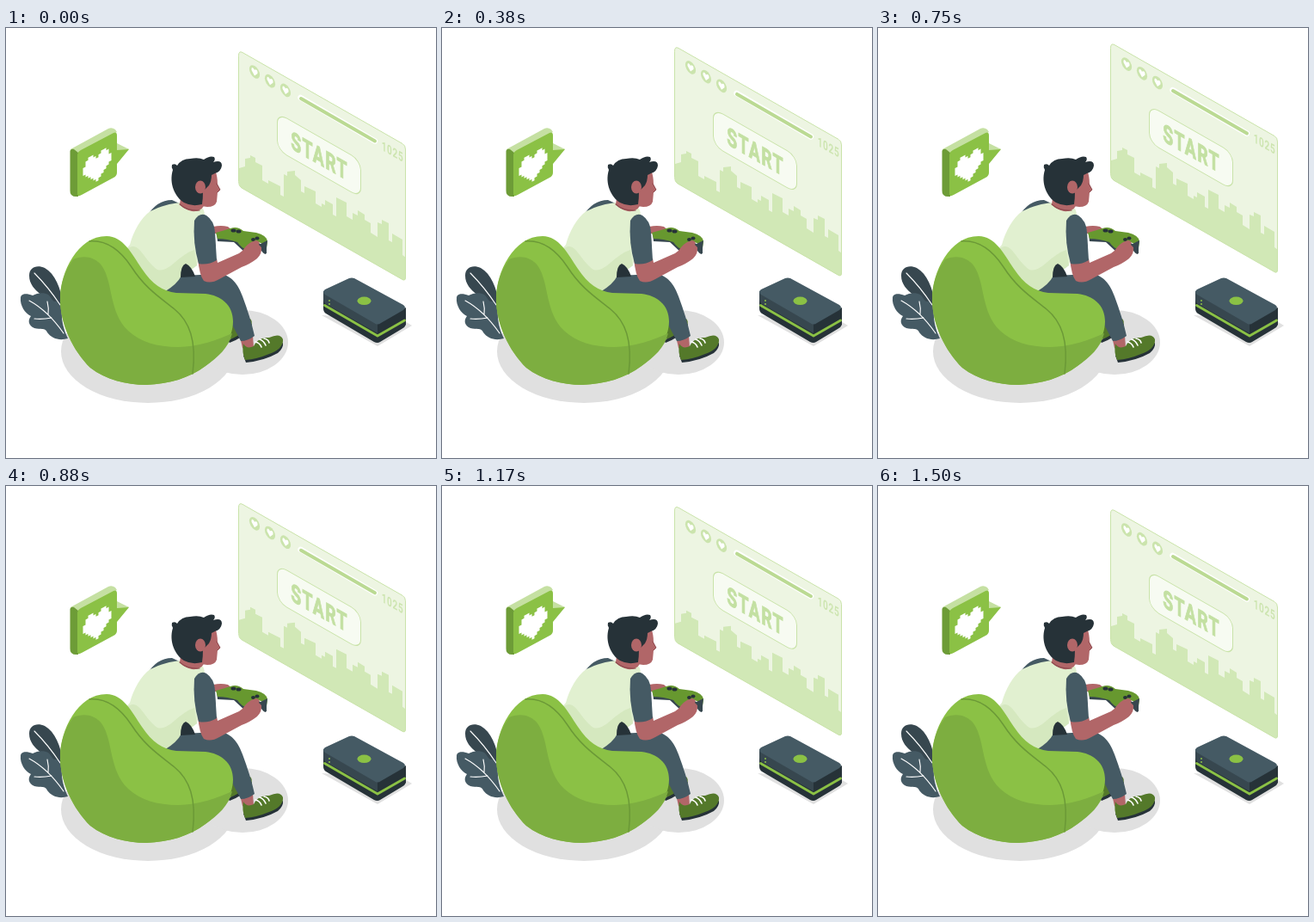
An HTML page that plays this animation: 500 px wide and 500 px high, repeating every 1.54 s.

```html
<!DOCTYPE html>
<html lang="en">
<head>
<meta charset="utf-8">
<title>Start screen</title>
<style>
html, body { margin: 0; width: 100%; height: 100%; overflow: hidden; background: #fff; }
svg { display: block; width: 100%; height: 100%; }
text { font-family: Roboto, Inter, sans-serif; font-weight: 700; text-anchor: middle; }
.line { fill: none; stroke-linecap: round; stroke-linejoin: round; }
.slate { fill: #455a64; }
.dusk { fill: #37474f; }
.ink { fill: #263238; }
.skin { fill: #b16668; }
.leaf { fill: #8bc145; }
.moss { fill: #54792a; }
</style>
</head>
<body>
<svg viewBox="0 0 500 500">
  <!-- floor shadows -->
  <g fill="#e0e0e0">
    <ellipse cx="165" cy="376" rx="101" ry="60"/>
    <ellipse cx="275" cy="365.500" rx="53" ry="37.500"/>
    <path d="M367 334L432 370L472 346L462 340Z"/>
  </g>

  <!-- plant -->
  <path class="dusk" d="M27 288C27 278 36 275 45 279C57 286 64 302 66 322L62 325C52 315 27 307 27 288Z"/>
  <path class="slate" d="M17 314C17 309 23 308 31 311C36 308 44 307 49 310C52 312 53 316 56 318C62 317 65 322 65 327C64 340 67 350 72 361C62 364 53 361 48 354C46 348 40 351 33 349C26 346 25 340 29 335C22 332 16 322 17 314Z"/>
  <g class="line" stroke="#fff" stroke-width="1.100">
    <path d="M33 285Q49 301 63 322"/>
    <path d="M27 317Q49 329 67 355M48 318Q50 326 49 333M33 338Q42 339 53 337"/>
  </g>

  <!-- torso -->
  <path class="slate" d="M164 219Q175 200 193 200L204 205L178 213Z"/>
  <path fill="#e1f0d0" d="M144 252C148 237 157 220 168 213C180 207 191 204 203 203L229 210C234 218 230 240 222 276L205 289Q198 303 186 310L150 295L135 262Z"/>
  <path fill="#d5e8bf" d="M140 258C154 244 160 270 176 281C190 285 200 264 219 258L222 276L205 289Q198 303 186 310L150 295Z"/>

  <!-- back foot and legs -->
  <path class="ink" d="M258 364L286 344L286 349Q274 361 260 366Z"/>
  <path class="moss" d="M258 344L271 347Q277 338 284 338Q287 341 285 346Q273 358 258 363Z"/>
  <path class="skin" d="M272 359L287 357L288 372Q282 377 275 372Z"/>
  <path class="slate" d="M184 307Q199 298 204 288L248 286C262 287 270 298 275 312C281 328 286 344 289 358Q281 364 273 364L255 330L215 318Z"/>
  <path class="ink" d="M203 290Q203 276 209 274Q216 277 220 289Z"/>
  <path class="ink" d="M276 381L279 389Q300 387 316 378Q323 372 322 366Z"/>
  <path class="moss" d="M276 367Q280 374 288 370C292 362 298 360 306 360Q319 354 322 362C323 370 315 376 306 379Q292 385 278 386Q274 377 276 367Z"/>
  <path class="line" stroke="#fff" stroke-width="1.600" d="M290 365Q295 366 297 371M295 362Q300 364 302 369M300 361Q305 362 306 366"/>

  <!-- bean bag -->
  <path class="leaf" d="M63 315C63 284 83 242 117 242C136 242 146 262 158 280C170 298 182 306 198 308L232 309C250 311 264 322 264 341C264 360 251 379 232 393C213 407 190 414 163 415C140 415 116 409 98 395C78 375 63 345 63 315Z"/>
  <path fill="#7dae40" d="M63 315C63 297 69 281 78 269C90 264 103 266 111 276C125 295 119 330 142 352C156 365 176 371 200 371C224 371 247 362 263 355C259 372 246 383 232 393C213 407 190 414 163 415C140 415 116 409 98 395C78 375 63 345 63 315Z"/>
  <path class="line" stroke="#6b9937" stroke-width="1.500" d="M97 248C119 246 134 260 146 278C162 303 180 314 196 327C213 341 222 363 217 402"/>

  <!-- head -->
  <path class="skin" d="M203 198L230 196L230 207Q226 214 216 213Q207 211 202 205Z"/>
  <path class="line" stroke="#8f4a4f" stroke-width="1.200" d="M202 205Q211 213 225 212"/>
  <path class="skin" d="M226 172L243 165Q246 172 246 182L249 188L246 191L245 202Q243 208 234 208Q226 208 223 198Z"/>
  <path class="line" stroke="#8f4a4f" stroke-width="1" d="M245 181L249 188L246 191"/>
  <path class="ink" d="M194 165Q192 162 193 159Q197 157 199 160Q204 152 214 152Q224 150 230 153Q237 148 242 150Q244 153 241 156Q251 153 251 160Q250 167 243 169L239 171Q239 178 236 183L229 190Q229 199 228 205Q216 208 207 203C197 197 189 181 194 165Z"/>
  <ellipse class="skin" cx="226" cy="185" rx="6" ry="7.500"/>

  <!-- controller and arms -->
  <path class="skin" d="M241 231Q250 229 258 231L264 236L258 240L243 239Z"/>
  <path class="dusk" d="M245 239L268 241L278 257L292 249L303 255L303 262Q300 264 296 257L279 262L265 249L246 248Z"/>
  <path fill="#67982f" d="M244 238Q255 235 261 233Q269 230 276 236L291 238Q303 241 304 248L303 256Q298 249 292 249L279 257Q274 256 269 249Q257 245 246 245Z"/>
  <path class="dusk" d="M296 251L304 247L302 263Q298 262 296 256Z"/>
  <g class="ink">
    <ellipse cx="264.500" cy="235.500" rx="3" ry="2"/><ellipse cx="270.500" cy="236.500" rx="3" ry="2"/>
    <ellipse cx="287.500" cy="246" rx="2.500" ry="2"/><ellipse cx="292" cy="244.500" rx="2.500" ry="2"/>
  </g>
  <path class="skin" d="M223 268L245 268L246 273L271 262Q275 260 278 255Q284 248 291 247Q296 248 294 252L297 255Q298 262 292 268Q283 275 274 278L248 292Q238 298 230 294Q225 288 223 268Z"/>
  <path class="slate" d="M219 224Q225 214 233 218Q242 224 243 237L245 270Q235 276 224 274Q217 250 219 224Z"/>

  <!-- like badge -->
  <path fill="#c5e0a2" d="M75 141L119 117Q123 115 127 118L129 121L84 145Z"/>
  <path fill="#6d9c37" d="M74.500 145Q74 140 79 141L84 145V196Q74 197 74.500 189Z"/>
  <path class="leaf" d="M83 148Q83 144 87 142L125 122Q129 120 129 125V137L143 141L129 158V168Q129 172 125 174L88 194Q83 197 83 192Z"/>
  <path fill="#c5e0a2" d="M129 134L143 141L129 142Z"/>
  <path id="heart" fill="#fff" transform="matrix(3 -1.65 0 3 106 145)"/>

  <!-- console -->
  <path class="ink" d="M369 312L432 348L465 328V345Q464 348 460 350L435 365Q432 367 428 365L372 332Q369 330 369 326Z"/>
  <path class="line" stroke="#8bc145" stroke-width="2.800" d="M370.500 322.500L432 358L463.500 340"/>
  <path class="ink" d="M369 306L432 344L465 325V333Q465 336 461 338L432 355L372 321Q369 319 369 316Z"/>
  <path class="dusk" d="M369 306L432 344V355L372 321Q369 319 369 316Z"/>
  <path class="slate" d="M371 304L399 291Q402 290 405 291L462 322Q466 325 462 328L436 343Q432 346 428 343L371 310Q367 307 371 304Z"/>
  <ellipse class="leaf" cx="416.500" cy="317.300" rx="8" ry="4.800"/>
  <g class="leaf"><circle cx="376" cy="317" r="1"/><circle cx="376" cy="321" r="1"/></g>

  <!-- floating screen -->
  <g id="screen">
    <path fill="#edf5e2" d="M270.500 32Q270.500 26 275 28.500L461 134.500Q464.500 136.500 464.500 141V290Q464.500 295 460 292L274 186Q270.500 184 270.500 179Z"/>
    <path fill="#d1e8b6" d="M271 163L278 161V152L284 151V148L290 151V156L298 160V177L305 181V177L319 184V194L323 196V170L327 172V167L336 166V171L343 177V190L347 192V184L360 190V204L367 208V204L371 206V200L380 205V217L384 219V197L396 203V219L403 223V215L409 218V212L417 217V223L424 227V238L432 243V226L437 228V223L445 227V247L449 249V239L461 246V264L465 267V290Q464.500 295 460 292L274 186Q271 184 271 179Z"/>
    <path class="line" stroke="#c9e3a9" stroke-width="1" d="M270.500 32Q270.500 26 275 28.500L461 134.500Q464.500 136.500 464.500 141V290Q464.500 295 460 292L274 186Q270.500 184 270.500 179Z"/>
    <g id="lives"></g>
    <g class="line">
      <path stroke="#fff" stroke-width="6.500" d="M342.500 81L429 131.500"/>
      <path stroke="#bbda93" stroke-width="4" d="M343 82L429 131.500"/>
    </g>
    <rect x="-48.500" y="-21.500" width="97" height="43" rx="11" fill="#f7fbf2" stroke="#c9e3a9" transform="matrix(1 .57 0 1 364 148)"/>
    <text transform="matrix(.67 .38 0 1 364.500 159)" font-size="29" letter-spacing="2" fill="#c3e0a2" stroke="#c3e0a2" stroke-width="1">START</text>
    <text transform="matrix(.67 .38 0 1 449.500 149)" font-size="15" letter-spacing="1" fill="#cde5b0">1025</text>
  </g>
</svg>
<script>
const $ = id => document.getElementById(id);

// Pixel heart: top and bottom of each column, mirrored around the middle
const tops = [3, 1, 0, 0, 1, 2];
let upper = "", lower = "";
for (let i = -5; i <= 5; i++) {
  const k = 5 - Math.abs(i), l = i - 0.5, r = i + 0.5;
  upper += `L${l} ${tops[k]}L${r} ${tops[k]}`;
  lower = `L${r} ${6 + k}L${l} ${6 + k}` + lower;
}
$("heart").setAttribute("d", "M" + (upper + lower).slice(1) + "Z");

for (let i = 0; i < 3; i++) {
  $("lives").innerHTML += `<g transform="matrix(.87 .5 0 1 ${289 + i * 18} ${51 + i * 10.7})">
    <circle r="7" fill="#cbe4ad"/>
    <path fill="#fff" d="M0 4.500L-4 0Q-4.500-4-2-3.500Q0-3 0-1.500Q0-3 2-3.500Q4.500-4 4 0Z"/></g>`;
}

// Linear float: [time in ms, vertical offset]
const loop = 1540;
const steps = [[0, 0], [710, -9.47], [1460, 0.53], [1500, 0], [loop, 0]];
$("screen").animate(
  steps.map(([t, y]) => ({ offset: t / loop, transform: `translateY(${y}px)` })),
  { duration: loop, iterations: Infinity, easing: "linear" }
);
</script>
</body>
</html>
```
